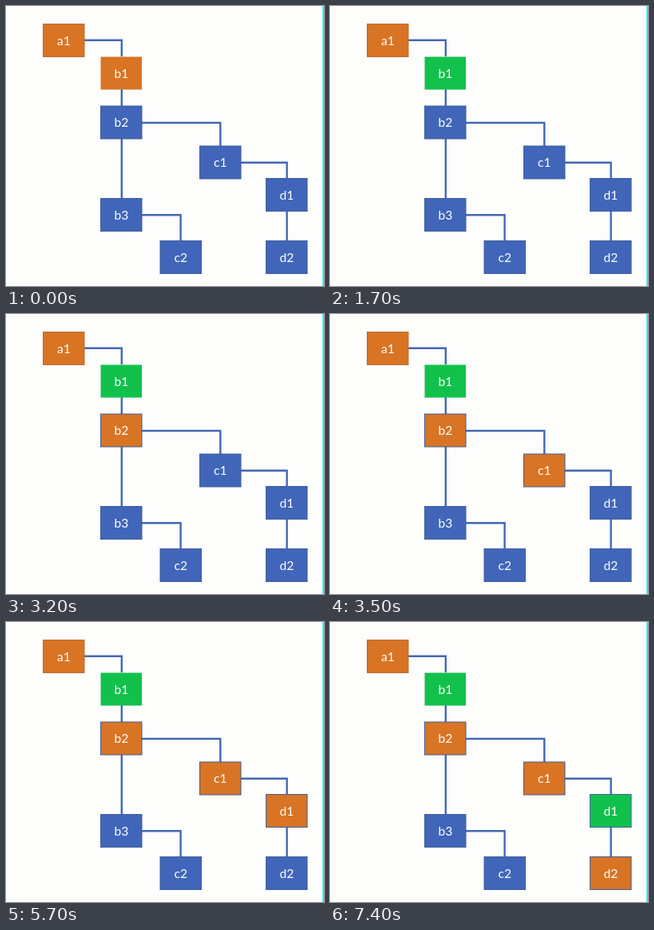
An HTML page for the animation above (8 s loop, 398x350 px).

```html
<!DOCTYPE html>
<html lang="en">
<head>
<meta charset="utf-8">
<title>Tree traversal</title>
<style>
  html, body { margin: 0; width: 100%; height: 100%; overflow: hidden; background: #fdfdfc; }
  svg { display: block; width: 398px; height: 350px; }
  text { font: 15.6px Lato, Carlito, sans-serif; fill: #fff; text-anchor: middle; }
  .links { fill: none; stroke: #4268b3; stroke-width: 2.4; }
</style>
</head>
<body>
<svg viewBox="0 0 398 350">
  <rect x="396" width="2" height="350" fill="#35e6fa"/>
  <path class="links" d="M98 42.7H144.8V63 M144.8 104V240 M170 146H268.3V175 M294 195.8H351.6V293 M170 261.2H218.6V293"/>
  <g id="nodes"></g>
</svg>
<script>
const LOOP = 8000;
const BLUE = '#4166b9', ORANGE = '#d87424', GREEN = '#12c14c';
const EDGE = '#3f5f9c';

// label, left, top, border, colour steps as [start ms, colour]
const nodes = [
  ['a1', 46.5, 22.5, '#b87038', [[0, ORANGE]]],
  ['b1', 118.5, 63.5, 'none', [[0, ORANGE], [1200, GREEN]]],
  ['b2', 118.5, 125, EDGE, [[0, BLUE], [2100, ORANGE]]],
  ['c1', 242.5, 175, EDGE, [[0, BLUE], [3500, ORANGE]]],
  ['b3', 118.5, 240.5, EDGE, [[0, BLUE]]],
  ['c2', 193, 293.5, EDGE, [[0, BLUE]]],
  ['d1', 325.5, 215.5, EDGE, [[0, BLUE], [5100, ORANGE], [6300, GREEN]]],
  ['d2', 325.5, 293.5, EDGE, [[0, BLUE], [7300, ORANGE]]]
];

function add(tag, attrs) {
  const el = document.createElementNS('http://www.w3.org/2000/svg', tag);
  for (const key in attrs) el.setAttribute(key, attrs[key]);
  return document.getElementById('nodes').appendChild(el);
}

for (const [label, x, y, stroke, steps] of nodes) {
  const box = add('rect', { x, y, width: 51.5, height: 41, stroke, fill: steps[0][1] });
  add('text', { x: x + 25.8, y: y + 26 }).textContent = label;
  const frames = steps.map(([at, fill]) => ({ offset: at / LOOP, fill, easing: 'step-end' }));
  frames.push({ offset: 1, fill: steps[steps.length - 1][1] });
  box.animate(frames, { duration: LOOP, iterations: Infinity });
}
</script>
</body>
</html>
```
